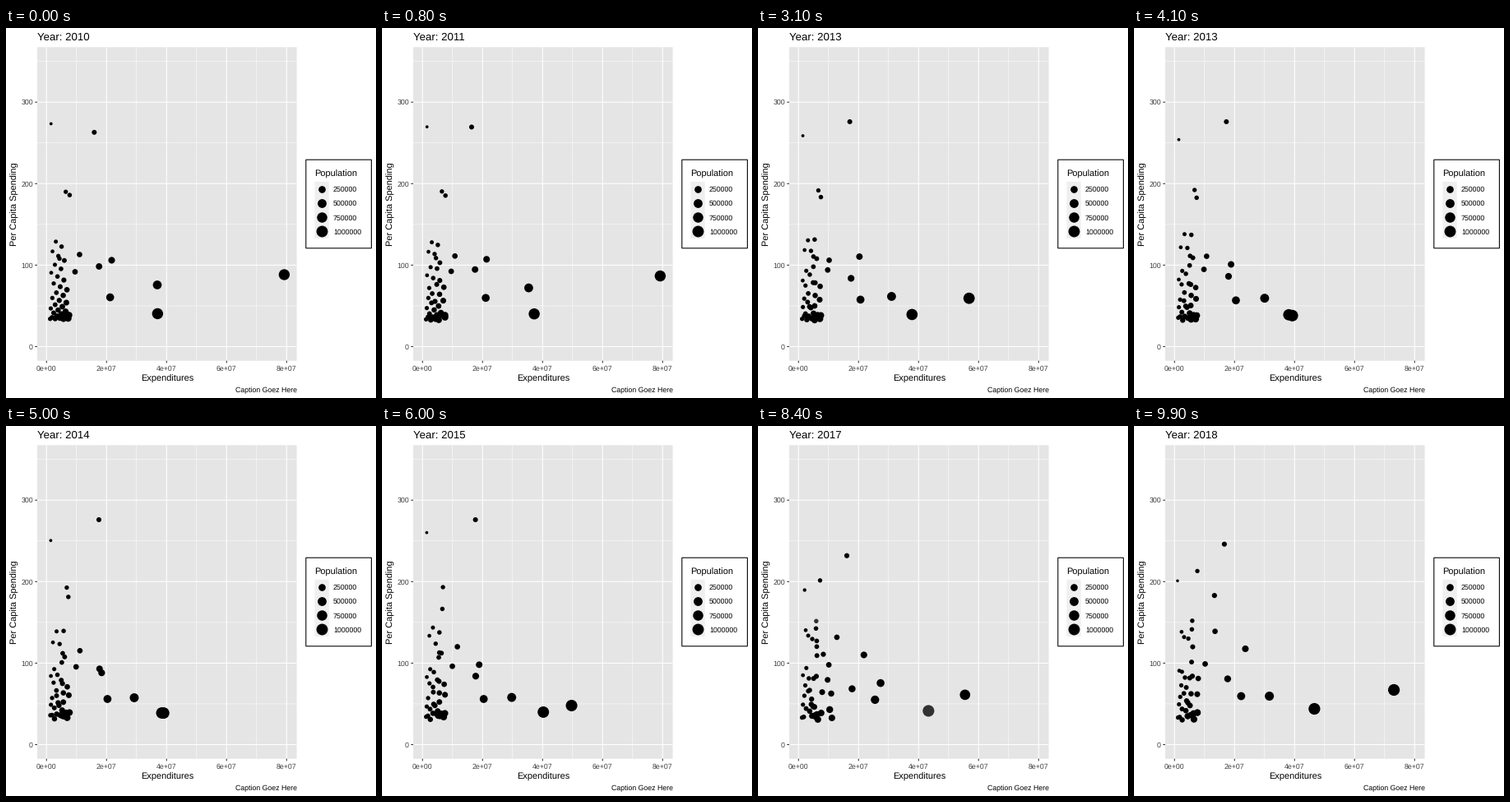
Recreate the animation shown at these times as a matplotlib script. Size 450 by 450 pixels, loop 10000 ms.

```python
import numpy as np
import matplotlib.pyplot as plt
from matplotlib.animation import FuncAnimation
from matplotlib.patches import Rectangle

SIZE, FRAMES, YEARS = 450, 100, 8
PANEL = (38, 23.3, 315.6, 381.4)  # left, top, width, height
CROWD = 34
plt.rcParams.update({"font.family": "Liberation Sans", "text.hinting": "none"})

fig = plt.figure(figsize=(SIZE / 72, SIZE / 72), dpi=72, facecolor="white")
ax = fig.add_axes([0, 0, 1, 1])
ax.set(xlim=(0, SIZE), ylim=(SIZE, 0))
ax.axis("off")


def px(millions):
    return 49.3 + 3.65 * millions


def py(per_capita):
    return 387.5 - 0.991 * per_capita


def radius(people):
    """Dot radius when area grows with population (in thousands)."""
    share = np.clip((people - 5) / 1060, 0, 1)
    return 1.77 + 5.33 * np.sqrt(share)


def box(x, y, w, h, fill, edge="none", lw=0.0):
    ax.add_patch(Rectangle((x, y), w, h, fc=fill, ec=edge, lw=lw, snap=False))


def line(xs, ys, color, lw):
    ax.plot(xs, ys, color=color, lw=lw, snap=False, solid_capstyle="butt")


def label(x, y, text, size, color="black", **kw):
    return ax.text(x, y, text, size=size, color=color, va="baseline", **kw)


def draw_chart():
    left, top, w, h = PANEL
    right, bottom = left + w, top + h
    box(*PANEL, "#e5e5e5")
    for v in range(10, 80, 20):
        line([px(v)] * 2, [top, bottom], "white", 0.53)
    for v in range(50, 400, 100):
        line([left, right], [py(v)] * 2, "white", 0.53)
    for v in range(0, 81, 20):
        x = px(v)
        line([x, x], [top, bottom], "white", 1.07)
        line([x, x], [bottom, bottom + 2.7], "#333333", 1.07)
        text = f"{v // 10}e+07" if v else "0e+00"
        label(x, 416.7, text, 8.8, "#404040", ha="center")
    for v in range(0, 301, 100):
        y = py(v)
        line([left, right], [y, y], "white", 1.07)
        line([left - 2.7, left], [y, y], "#333333", 1.07)
        label(33, y + 3.2, str(v), 8.8, "#404040", ha="right")
    label(195.8, 429.4, "Expenditures", 11, ha="center")
    label(13.6, 214, "Per Capita Spending", 11, rotation=90,
          rotation_mode="anchor", ha="center")
    label(353.5, 443, "Caption Goez Here", 8.8, ha="right")


def draw_legend():
    box(364.8, 160.2, 79.6, 107.6, "white", "black", 1.07)
    label(375.4, 181, "Population", 11)
    for i in range(4):
        y = 195.5 + 17.28 * i
        people = 250 * (i + 1)
        box(375.4, y - 8.64, 17.28, 17.28, "#efefef")
        ax.scatter(384, y, s=4 * radius(people) ** 2, c="black", lw=0)
        label(398, y + 3.6, f"{people}000", 8.8)


def path(points):
    """Columns year, x, y, radius from (year, millions, per capita)."""
    t, spent, rate = np.array(points, float).T
    return np.column_stack([t, px(spent), py(rate), radius(1000 * spent / rate)])


# Key points of the dots that stand apart, biggest spenders first
rows = {
    "top": [(0, 79.2, 88.3), (1, 79.2, 85.8), (2, 74.4, 81.2), (3, 39.6, 37.9),
            (4, 38.5, 38.3), (6, 64.8, 61), (8, 73.1, 67.1)],
    "low": [(0, 37, 40.4), (4, 38.3, 38.8), (6, 42.9, 41.4), (7, 43.3, 41.4),
            (8, 46.6, 43.9)],
    "second": [(0, 36.9, 75.7), (2.5, 31, 61.6), (4, 29.2, 57.5),
               (8, 31.6, 59.5)],
    "third": [(0, 21.2, 60.5), (4, 20.3, 56), (6, 20.5, 56), (7, 21.6, 73),
              (8, 22.2, 59.5)],
    "fourth": [(0, 17.5, 98.4), (2.5, 17.5, 83.8), (4, 18.4, 88.3),
               (6, 16.8, 78.2), (8, 17.7, 80.7)],
    "fifth": [(0, 21.7, 106), (2.5, 20.3, 110.5), (4, 17.6, 92.8),
              (8, 23.6, 117.6)],
    "lavish": [(0, 15.9, 263), (1.3, 16.8, 276), (6, 17.9, 276), (7, 15.6, 220),
               (8, 16.6, 246)],
    "tiny": [(0, 1.5, 273.5), (4, 1.4, 250), (6, 1.4, 274), (7, 2.2, 167),
             (8, 1, 201)],
    "steady": [(0, 6.4, 190), (6, 6.9, 194), (8, 7.6, 213)],
    "falling": [(0, 7.7, 186), (4, 7.3, 182), (5.7, 5.9, 151), (8, 5.9, 152)],
    "rising": [(0, 11, 113), (2.5, 10.2, 106), (8, 13.5, 139)],
    "jumping": [(0, 4.3, 108), (6, 5.9, 114), (7, 8.9, 110), (8, 13.3, 183)],
    "flat": [(0, 9.5, 91.8), (8, 10.2, 99)],
}


def add_crowd():
    """Evenly scattered small dots whose spending per head drifts yearly."""
    rng = np.random.default_rng(4)
    years = np.arange(YEARS + 1)
    for i in range(CROWD):
        u = (i + 0.5) / CROWD
        spent = 1.2 + (7.3 - 2.5 * u) * (0.618 * i % 1)
        rate = 34 + 98 * u ** 2.2
        drift = np.exp(np.append(0, rng.normal(0, 0.04, YEARS).cumsum()))
        rows[i] = list(zip(years, spent * drift, rate * drift))


add_crowd()
rows = {name: path(points) for name, points in rows.items()}

# Between years 6 and 7 each dot in a chain takes the place of the next one,
# and a new dot fades in at the head.
CHAINS = [["low", 2, 14, "top", "fourth", 21, 9, "second", 19, 17, "third", 8],
          ["falling", 27]]
successor = {a: b for chain in CHAINS for a, b in zip(chain, chain[1:])}
dots = [(rows[n], rows[successor.get(n, n)]) for n in rows]
dots += [(rows[chain[0]],) * 2 for chain in CHAINS]
fresh = len(CHAINS)


def at(row, t):
    return np.array([np.interp(t, row[:, 0], row[:, c]) for c in (1, 2, 3)])


def place(before, after, t):
    mix = np.clip(t - 6, 0, 1)
    if mix == 0:
        return at(before, t)
    return (1 - mix) * at(before, 6) + mix * at(after, max(t, 7))


def place_fresh(row, t):
    return at(row, max(t, 7))


draw_chart()
draw_legend()
title = label(38, 15.2, "", 13.2)
blank = np.zeros(len(dots))
marks = ax.scatter(blank, blank, lw=0, zorder=3)


def update(frame):
    t = YEARS * frame / (FRAMES - 1)
    pos = [place(a, b, t) for a, b in dots[:-fresh]]
    pos += [place_fresh(a, t) for a, _ in dots[-fresh:]]
    pos = np.array(pos)
    colors = np.zeros((len(dots), 4))
    colors[:, 3] = 1
    colors[-fresh:, 3] = np.clip(t - 6, 0, 1)
    marks.set_offsets(pos[:, :2])
    marks.set_sizes(4 * pos[:, 2] ** 2)
    marks.set_facecolors(colors)
    title.set_text(f"Year: {round(2010 + t)}")
    return marks, title


anim = FuncAnimation(fig, update, frames=FRAMES, interval=100, repeat=True)
plt.show()
```
